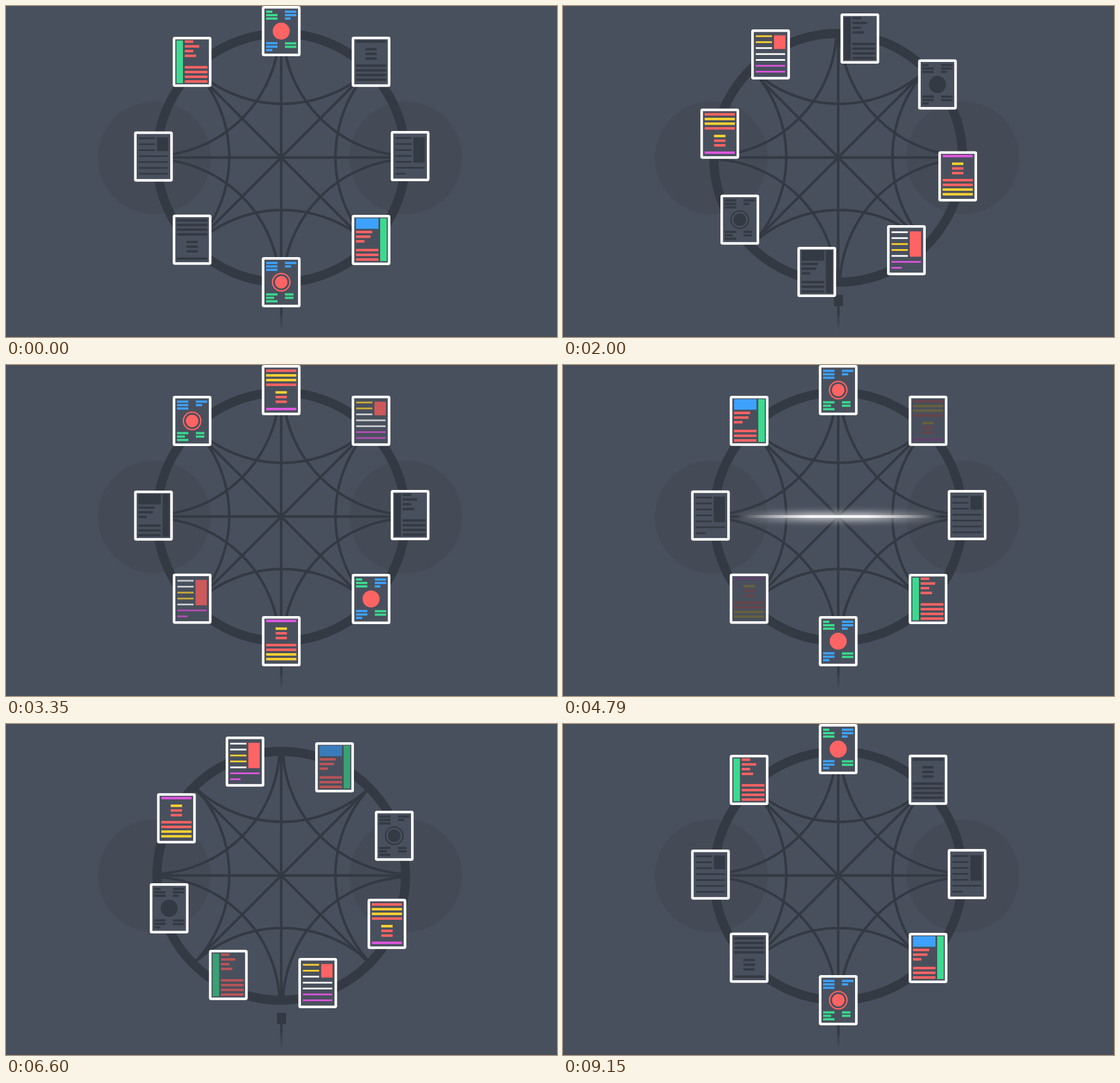
An HTML page for the animation above (9180 ms loop, 966 by 580 pixels).

```html
<!DOCTYPE html>
<html lang="en">
<head>
<meta charset="utf-8">
<title>Card wheel</title>
<style>
  html, body { margin: 0; width: 100%; height: 100%; overflow: hidden; background: #49505d; }
  svg { display: block; width: 966px; height: 580px; }
</style>
</head>
<body>
<svg id="stage" viewBox="0 0 966 580" xmlns="http://www.w3.org/2000/svg">
  <defs>
    <linearGradient id="tail" gradientUnits="userSpaceOnUse" x1="0" y1="526" x2="0" y2="570">
      <stop offset=".25" stop-color="#343a43"/>
      <stop offset="1" stop-color="#343a43" stop-opacity="0"/>
    </linearGradient>
    <linearGradient id="shine" gradientUnits="userSpaceOnUse" x1="305" y1="0" x2="660" y2="0">
      <stop offset="0" stop-color="#fff" stop-opacity="0"/>
      <stop offset=".36" stop-color="#fff" stop-opacity=".9"/>
      <stop offset=".64" stop-color="#fff" stop-opacity=".9"/>
      <stop offset="1" stop-color="#fff" stop-opacity="0"/>
    </linearGradient>
    <filter id="soft" filterUnits="userSpaceOnUse" x="280" y="230" width="406" height="72">
      <feGaussianBlur stdDeviation="5.5"/>
    </filter>
  </defs>
  <g fill="#454b56">
    <circle cx="260" cy="266" r="99"/>
    <circle cx="701" cy="266" r="99"/>
  </g>
  <g id="web" fill="none" stroke="#343a43" stroke-width="4.5">
    <circle cx="482.5" cy="266" r="218" stroke-width="16"/>
  </g>
  <rect x="475" y="506" width="16" height="20" fill="#343a43"/>
  <rect x="480.5" y="526" width="4.5" height="44" fill="url(#tail)"/>
  <g id="beam" opacity="0">
    <rect x="305" y="258" width="355" height="15.5" fill="url(#shine)" opacity=".65" filter="url(#soft)"/>
    <rect x="305" y="263" width="355" height="5" fill="url(#shine)"/>
  </g>
  <g id="cards"></g>
</svg>
<script>
const LOOP = 9180, MOVE = 300, FADE = 500, LIGHT = 170, FLASH = 150;
const DARK = '#343a43', RED = '#ff6464', GREEN = '#3cd98f', BLUE = '#3ea1fd',
      YELLOW = '#ffd235', PINK = '#df56df', WHITE = '#fff';

// Resting places, clockwise from the top
const SLOTS = [[482.5, 44], [640, 97.7], [708.5, 263], [640, 410],
               [482.5, 484], [326.3, 409.5], [258.5, 263.8], [326.3, 97.9]];

// One row per stop, in ms
const STOPS = [
  { flash: 95,   light: 410,  fade: 810,  go: 785 },
  { flash: 1300, light: 1550, fade: 1450, go: 1903 },
  { flash: 2475, light: 2610, fade: 3225, go: 3055 },
  { flash: 3680, light: 3880, fade: 4415, go: 4270 },
  { flash: 4715, light: 4900, fade: 4970, go: 5215 },
  { flash: 5655, light: 5965, fade: 6425, go: 6433 },
  { flash: 7020, light: 7250, fade: 7680, go: 7647 },
  { flash: 8250, light: 8480, fade: 8500, go: 8855 }
];

const box = (fill, x, y, w, h) => `<rect x="${x}" y="${y}" width="${w}" height="${h}" fill="${fill}"/>`;
const bar = (fill, x, y, w, h = 4.4) => box(fill, x, y - h / 2, w, h);
const column = (fill, x, y, step, widths, h) =>
  widths.map((w, i) => bar(fill, x, y + i * step, w, h)).join('');
const stripes = (fills, x, y, step, w, h) =>
  fills.map((f, i) => bar(f, x, y + i * step, w, h)).join('');
const disc = (fill, r) => `<circle r="${r}" fill="${fill}"/>`;

// Each design takes a paint function so it can be drawn lit or dark
const DESIGNS = [
  p => column(p(GREEN), -26.5, -34, 6, [11, 20, 20], 4) + column(p(BLUE), 6.5, -34, 6, [20, 20, 10], 4) +
       disc(p(RED), 15) +
       column(p(BLUE), -26.5, 21.2, 6, [20, 20, 11], 4) + column(p(GREEN), 6.5, 21.5, 6, [20, 20], 4),
  p => bar(p(PINK), -26.5, -35.5, 53) +
       stripes([YELLOW, RED, RED].map(p), -10, -22, 8.2, 20) +
       stripes([RED, RED, YELLOW, YELLOW].map(p), -26.5, 6.8, 8.2, 53),
  p => stripes([WHITE, WHITE, YELLOW, YELLOW, WHITE].map(p), -26, -31.5, 10.4, 28.5, 3) +
       column(p(PINK), -26, 20.5, 10.4, [51.5, 18], 3) + box(p(RED), 5.8, -33, 20, 44.5),
  p => box(p(BLUE), -26.5, -38, 39.5, 18.5) + box(p(GREEN), 16, -38, 11.5, 75) +
       column(p(RED), -26.5, -14, 8.2, [28.5, 25.5, 15]) +
       column(p(RED), -26.5, 17.7, 8.3, [39.5, 39.5, 39.5]),
  p => column(p(BLUE), -26.5, -33.7, 6, [20, 20, 20], 4) + column(p(BLUE), 6.5, -33.7, 6, [20, 11], 4) +
       disc(p(RED), 11) + `<circle r="15.3" fill="none" stroke="${p(RED)}" stroke-width="2.4"/>` +
       column(p(GREEN), -26.5, 21.4, 6, [20, 14, 20], 4) + column(p(GREEN), 6.5, 21.4, 6, [15, 15], 4),
  p => stripes([RED, YELLOW, YELLOW, RED].map(p), -26.5, -34, 8.2, 53) +
       stripes([YELLOW, RED, RED].map(p), -10, 4, 8.2, 20) + bar(p(PINK), -26.5, 33.2, 53),
  p => stripes([YELLOW, YELLOW, WHITE].map(p), -26, -32, 10.4, 28.5, 3) +
       stripes([WHITE, WHITE, PINK, PINK].map(p), -26, -.7, 10.3, 51.5, 3) + box(p(RED), 6, -33.5, 20, 24),
  p => box(p(GREEN), -27.5, -37.5, 11.5, 75) +
       column(p(RED), -13, -35.5, 8.3, [15, 25.5, 15, 20]) +
       column(p(RED), -13, 9.5, 8.3, [40, 40, 40, 40])
];

function drawWeb() {
  const at = (i, dx = 0, dy = 0) => {
    const a = i * Math.PI / 4;
    return `${482.5 + dx + 218 * Math.sin(a)} ${265.5 + dy - 218 * Math.cos(a)}`;
  };
  let d = '';
  for (let i = 0; i < 4; i++) d += `M${at(i)}L${at(i + 4)}`;
  for (let i = 0; i < 8; i++) {
    // Corner arcs sit a little outwards, side arcs a little to the right
    const mid = (i + 1) * Math.PI / 4;
    const shift = i % 2 ? [2, -1] : [4 * Math.sin(mid), -4 * Math.cos(mid)];
    d += `M${at(i, ...shift)}A225 225 0 0 0 ${at(i + 2, ...shift)}`;
  }
  document.getElementById('web').insertAdjacentHTML('beforeend', `<path d="${d}"/>`);
}

function drawCards() {
  const root = document.getElementById('cards');
  root.innerHTML = DESIGNS.map(design => `<g>
    <rect x="-31.7" y="-41.7" width="63.4" height="83.4" rx="1.5" fill="#49505d" stroke="#fff" stroke-width="4.5"/>
    <g>${design(() => DARK)}</g><g>${design(c => c)}</g></g>`).join('');
  return [...root.children].map(node => ({ node, lit: node.lastElementChild }));
}

drawWeb();
const cards = drawCards();
const beam = document.getElementById('beam');
const clamp = v => Math.max(0, Math.min(1, v));
const ease = p => (1 - Math.cos(Math.PI * p)) / 2;
const ramp = (t, start, length) => clamp((t - start) / length);

function render(t) {
  // The last move belongs to the stop that opens the next loop
  if (t >= STOPS[7].go) t -= LOOP;
  const k = STOPS.findIndex(s => t < s.go);
  const stop = STOPS[k], prev = STOPS[(k + 7) % 8], shift = k ? 0 : LOOP;
  const move = ease(ramp(t, prev.go - shift, MOVE));
  const glow = [
    () => 1 - ramp(t, stop.fade, FADE),
    () => 1 - ramp(t, prev.fade - shift, FADE),
    () => ramp(t, stop.light, LIGHT),
    () => 1
  ];
  cards.forEach((card, i) => {
    const slot = (i + k) % 8, to = SLOTS[slot], from = SLOTS[(slot + 7) % 8];
    const [x, y] = to.map((v, j) => from[j] + (v - from[j]) * move);
    card.node.setAttribute('transform', `translate(${x.toFixed(2)} ${y.toFixed(2)})`);
    card.lit.setAttribute('opacity', glow[slot % 4]().toFixed(3));
  });
  beam.setAttribute('opacity', Math.sin(Math.PI * ramp(t, stop.flash, FLASH)).toFixed(3));
}

const begin = performance.now();
function tick() {
  render((performance.now() - begin) % LOOP);
  requestAnimationFrame(tick);
}
tick();
</script>
</body>
</html>
```
